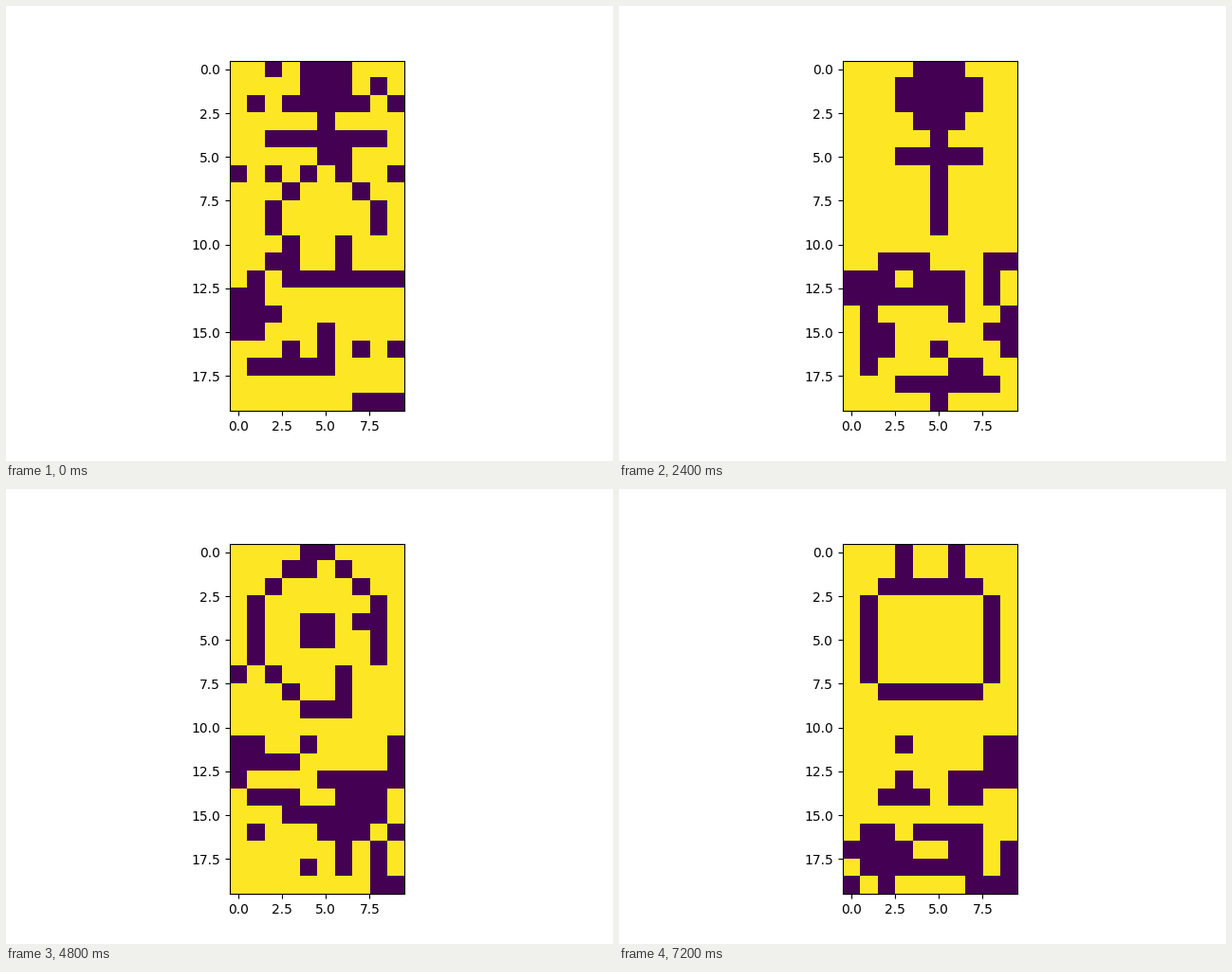
Write a matplotlib script that moves like this. It is 640x480 px and loops after 8 s.

```python
import numpy as np
import matplotlib.pyplot as plt
from matplotlib.animation import FuncAnimation

ROWS, COLS = 20, 10
CODE_TOP = 11
STEP_MS = 800
LIGHT, DARK = 1, -1
SPECKLE, NOISE = 0.15, 0.09


def person(g):
    g[0:3, 4:7] = DARK
    g[3:6, 5] = DARK
    g[4, 2:9] = DARK
    for r in range(6, 10):
        reach = min(r - 5, 3)
        g[r, [5 - reach, 5 + reach]] = DARK
    # code area: a few main masses
    g[11:13, 6:8] = DARK
    g[12, 5:] = DARK
    g[12:14, 2:4] = DARK
    g[13:15, 1:3] = DARK
    g[14:16, 0:2] = DARK
    g[15:18, 5] = DARK
    g[17, 1:6] = DARK
    g[19, 7:] = DARK


def tree(g):
    g[0:4, 4:7] = DARK
    g[1:3, 3:8] = DARK
    g[4:10, 5] = DARK
    g[5, 3:8] = DARK
    # code area
    g[11, 2:5] = DARK
    g[12:14, 0:3] = DARK
    g[12:14, 4:7] = DARK
    g[13, 3] = DARK
    g[11:14, 8] = DARK
    g[14:17, 9] = DARK
    g[15:17, 1:3] = DARK
    g[17:19, 6:8] = DARK
    g[18, 3:9] = DARK


def key(g):
    for r in range(6):
        g[r, 9 - r] = DARK
    for r in range(2, 5):
        g[r, 11 - r] = DARK
    g[6:10, 1:4] = DARK
    g[7:9, 0:5] = DARK
    g[7:9, 2] = LIGHT
    # code area
    g[11:16, 4] = DARK
    g[13, 0:5] = DARK
    g[14:16, 8:] = DARK
    g[15:17, 5:7] = DARK
    g[16:18, 9] = DARK
    g[16:20, 7] = DARK
    g[17:20, 2:4] = DARK


def eye(g):
    for r in range(5):
        c = round(4 - 3 * np.sin(r * np.pi / 8) ** 1.5)
        g[[r, r, 9 - r, 9 - r], [c, 9 - c, c, 9 - c]] = DARK
    g[4:6, 4:6] = DARK
    # code area
    g[11, 0:3] = DARK
    g[12, 1:4] = DARK
    g[11:14, 9] = DARK
    g[13:18, 6] = DARK
    g[13:15, 7] = DARK
    g[14, 1:4] = DARK
    g[15, 3:7] = DARK
    g[14:20, 8] = DARK
    g[16, 5:] = DARK


def robot(g):
    g[0:2, [3, 6]] = DARK
    g[[2, 8], 2:8] = DARK
    g[3:8, [1, 8]] = DARK
    # code area
    g[11:14, 8:] = DARK
    g[13:15, 6:8] = DARK
    g[14, 2:5] = DARK
    g[16, 4:8] = DARK
    g[17, 0:4] = DARK
    g[16:20, 7] = DARK
    g[16:20, 2] = DARK
    g[18, 2:6] = DARK
    g[17:20, 9] = DARK


def recall(draw, seed):
    """Return a noisy cue and the clean pattern it recalls."""
    rng = np.random.default_rng(seed)
    clean = np.full((ROWS, COLS), LIGHT)
    draw(clean)
    code = clean[CODE_TOP:]
    code[rng.random(code.shape) < SPECKLE] = DARK
    cue = np.where(rng.random(clean.shape) < NOISE, -clean, clean)
    return cue, clean


shapes = [person, tree, key, eye, robot]
states = [g for seed, draw in enumerate(shapes) for g in recall(draw, seed)]

fig, ax = plt.subplots(figsize=(6.4, 4.8), dpi=100)
image = ax.imshow(states[0], vmin=DARK, vmax=LIGHT)


def update(i):
    image.set_data(states[i])
    return [image]


anim = FuncAnimation(fig, update, frames=len(states), interval=STEP_MS,
                     repeat=True, repeat_delay=0)
plt.show()
```
